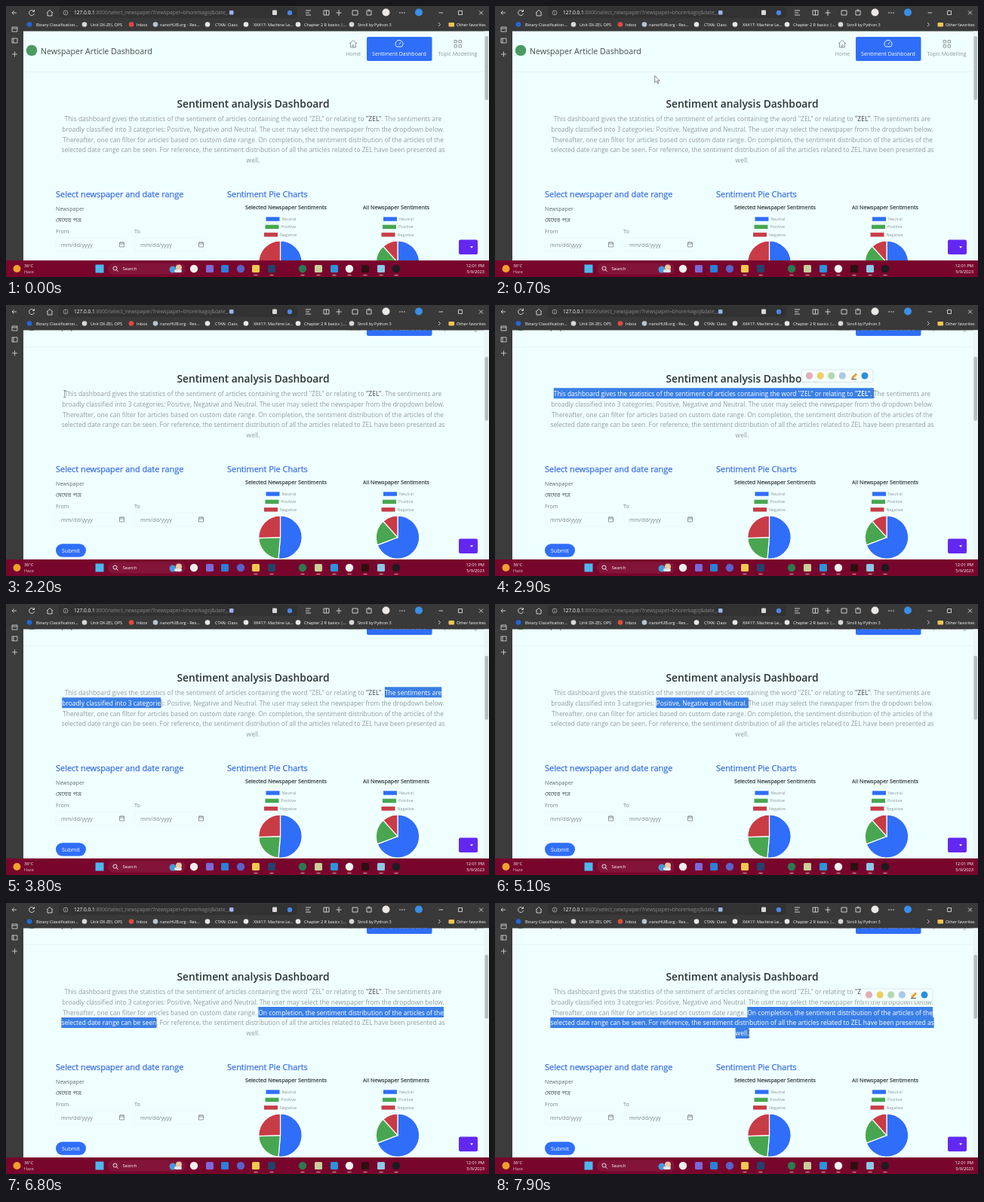
Animation of 640 by 360 pixels, one loop 8 s. Source, as an HTML page:

```html
<!DOCTYPE html>
<html lang="en">
<head>
<meta charset="utf-8">
<title>Dashboard walkthrough</title>
<style>
  html, body { margin: 0; width: 100%; height: 100%; overflow: hidden; background: #393939; }
  svg { display: block; width: 640px; height: 360px; font-family: "Open Sans", "Noto Sans", sans-serif; }
  text { white-space: pre; }
  .key { fill: var(--key); font-weight: 600; }
</style>
</head>
<body>
<svg id="stage" viewBox="0 0 640 360"></svg>
<script>
const BLUE = '#2f6ef8', GREEN = '#48a650', RED = '#c83c46', GREY = '#8c9494', PAGE = '#efffff';
const LOOP = 8000, SCROLL = 32, LINE_Y = 118, PITCH = 13.9;

const lines = [
  'This dashboard gives the statistics of the sentiment of articles containing the word "ZEL" or relating to "ZEL". The sentiments are',
  'broadly classified into 3 categories: Positive, Negative and Neutral. The user may select the newspaper from the dropdown below.',
  'Thereafter, one can filter for articles based on custom date range. On completion, the sentiment distribution of the articles of the',
  'selected date range can be seen. For reference, the sentiment distribution of all the articles related to ZEL have been presented as',
  'well.'
];

// Markup helpers
const text = (x, y, size, str, fill = '#fff', more = '') =>
  `<text x="${x}" y="${y}" font-size="${size}" fill="${fill}" ${more}>${str}</text>`;
const box = (x, y, w, h, fill, rx = 0, more = '') =>
  `<rect x="${x}" y="${y}" width="${w}" height="${h}" rx="${rx}" fill="${fill}" ${more}/>`;
const dot = (x, y, r, fill) => `<circle cx="${x}" cy="${y}" r="${r}" fill="${fill}"/>`;
const stroke = (d, color = '#ddd', w = 0.9) => `<path d="${d}" fill="none" stroke="${color}" stroke-width="${w}"/>`;
const mid = 'text-anchor="middle"', end = 'text-anchor="end"';
const medium = color => `stroke="${color}" stroke-width=".25"`;

function slice(cx, cy, r, from, to, fill) {
  const p = deg => {
    const a = deg * Math.PI / 180;
    return `${cx + r * Math.sin(a)} ${cy - r * Math.cos(a)}`;
  };
  return `<path d="M${cx} ${cy}L${p(from)}A${r} ${r} 0 ${+(to - from > 180)} 1 ${p(to)}Z" fill="${fill}" stroke="#fff" stroke-width="1.2"/>`;
}

function chart(x, title, titleX, greenAt, redAt) {
  const legend = [['Neutral', BLUE], ['Positive', GREEN], ['Negative', RED]].map(([name, fill], i) => {
    const lx = x - 20 - (i === 2 ? 1.5 : i ? 0 : -1), y = 283 + i * 10.4;
    return box(lx, y - 2.7, 18, 5.4, fill) + text(lx + 21, y + 2, 5.4, name, GREY);
  }).join('');
  return text(titleX, 270.2, 7.2, title, '#3c4444', `${mid} font-weight="500" ${medium('#3c4444')}`) + legend +
    slice(x, 340.6, 28.7, 0, greenAt, BLUE) +
    slice(x, 340.6, 28.7, greenAt, redAt, GREEN) +
    slice(x, 340.6, 28.7, redAt, 360, RED);
}

const calendar = x => stroke(`M${x - 3} 314h6v6h-6zM${x - 3} 316h6M${x - 1.5} 313v2M${x + 1.5} 313v2`, '#7c8484', 0.8);
const dateField = x => text(x, 319.7, 7.2, 'mm/dd/yyyy', '#7c8484') + calendar(x + 80.5) +
  box(x - 7, 308, 93, 18, 'none', 2, 'stroke="#e6f5f5" stroke-width=".6"');

const paragraph = lines.map((line, i) =>
  `<text x="327.5" y="${LINE_Y + SCROLL + 2.7 + i * PITCH}" font-size="8.43" ${mid}>` +
  line.replace(/"ZEL"(?=\.)/, '<tspan class="key">$&</tspan>') + '</text>').join('');

const page = `
  ${box(23, 87, 611, 0.6, '#e2f1f1')}
  ${dot(34, 59, 7.3, '#4b9a62')}
  ${text(46, 64, 10.63, 'Newspaper Article Dashboard', '#454d4d')}
  ${stroke('M455 50l5-4.5 5 4.5M456.5 49v6h7v-6M459 55v-3h2v3', '#8a9090')}
  ${text(460.5, 66.3, 6.8, 'Home', GREY, mid)}
  ${box(478, 41, 86.5, 32, BLUE, 2)}
  ${stroke('M517.5 54a5 5 0 1 1 7 0zM521 51l2-3', '#fff')}
  ${text(521, 66.3, 7.05, 'Sentiment Dashboard', '#fff', mid)}
  ${stroke('M594 45.5h3.5v3.5h-3.5zM600 45.5h3.5v3.5h-3.5zM594 51.5h3.5v3.5h-3.5zM600 51.5h3.5v3.5h-3.5z', '#8a9090')}
  ${text(598.5, 66.3, 7.15, 'Topic Modelling', GREY, mid)}
  ${text(327.5, 135, 13.8, 'Sentiment analysis Dashboard', '#2b3333', mid + ' font-weight="600"')}
  <g style="fill:#949c9c;--key:#687070"><g id="para">${paragraph}</g></g>
  <g clip-path="url(#selected)">
    ${box(23, 140, 611, 75, '#3a7fe6')}
    <use href="#para" style="fill:#fff;--key:#fff"/>
  </g>
  ${text(66, 253.5, 10.95, 'Select newspaper and date range', '#3a6ee8', medium('#3a6ee8'))}
  ${text(293, 253.5, 10.95, 'Sentiment Pie Charts', '#3a6ee8', medium('#3a6ee8'))}
  ${text(66, 271.7, 7.15, 'Newspaper', '#626a6a')}
  ${text(66, 287, 8, 'মেঘের পত্র', '#5a6262', 'font-family="Noto Sans Bengali, Noto Sans, sans-serif"')}
  ${text(66, 301.7, 7.2, 'From', '#7c8484')}
  ${text(170, 301.7, 7.2, 'To', '#7c8484')}
  ${dateField(73)}${dateField(178)}
  ${box(66, 349.3, 40, 17.5, BLUE, 8.7)}
  ${text(86, 360.7, 7.2, 'Submit', '#fff', mid)}
  ${chart(363.5, 'Selected Newspaper Sentiments', 371, 185, 268)}
  ${chart(519, 'All Newspaper Sentiments', 517, 249, 318)}`;

const bookmarks = [
  [31, 40, 'Binary Classification...', '#2467d8'],
  [104, 112, 'Unit DX-ZEL OPS', '#d8d8d8'],
  [166, 173, 'Inbox', '#e04a3f'],
  [198, 204, 'nanoHUB.org - Res...', '#b8c4d0'],
  [267, 277, 'CTAN: Class', '#e8e8e8'],
  [318, 328, 'XK417: Machine Le...', '#e8e8e8'],
  [387, 395, 'Chapter 2 R basics |...', '#e8e8e8'],
  [458, 466, 'Stroll by Python 3', '#d8d8d8']
].map(([ix, x, name, fill]) => dot(ix, 24.5, 3.3, fill) + text(x, 26.8, 5.5, name)).join('');

const url = '127.0.0.1:8000/select_newspaper/?newspaper=bhorerkagoj&amp;date_from=2023-...';

const chrome = `
  ${box(0, 0, 640, 33.5, '#393939')}
  ${box(0, 33, 23, 305, '#3c3c3c')}
  ${box(70, 1, 316, 15, '#323232', 4)}
  ${stroke('M14 9H8m2.5-2.5L8 9l2.5 2.5M37 7a3.5 3.5 0 1 0 .5 3M37.5 5v2.5H35M54 9l4-3.5L62 9M55 8.5V13h6V8.5')}
  ${stroke('M79 8v3M79 6v1M76 9a3 3 0 1 0 6 0a3 3 0 1 0-6 0', '#bbb', 0.7)}
  ${text(90, 11.3, 6.6, '127.0.0.1<tspan fill="#888">:8000/select_newspaper/?newspaper=bhorerkagoj&amp;date_...</tspan>')}
  ${box(296, 6, 5.5, 5.5, '#9db4ee', 1)}
  ${box(353, 5.5, 6, 6.5, '#d8d8d8', 1)}
  ${dot(376, 9, 3.2, '#4a86e0')}
  ${stroke('M397 6h7M397 9h5M397 12h7M421 6h7v6h-7zM424.5 6v6M441 5v8M437.5 9h7M459 6h7v6h-7zM478 6h6v6h-6zM481 4v4')}
  ${dot(503.5, 8.5, 5, '#ece8e6')}
  ${[522, 525, 528].map(x => dot(x, 9, 0.8, '#ddd')).join('')}
  ${dot(547, 8.5, 5, '#3a8fe8')}
  ${stroke('M573.5 9h5.5M599.5 6.5h5v5h-5zM627 6.5l5 5M632 6.5l-5 5')}
  ${bookmarks}
  ${stroke('M573 22l2.5 2.5L573 27')}
  ${box(586.5, 22, 7.5, 5.5, '#f0c552', 1)}
  ${text(597, 26.8, 5.5, 'Other favorites')}
  ${stroke('M8 28h7v6H8zM8 30h7M8 43h7v6H8zM10 43v6M8 64h7M11.5 60.5v7', '#ddd', 0.8)}
  ${box(633.5, 33.5, 6.5, 304.5, '#eaf5f5')}
  <rect id="thumb" x="634.5" width="4.5" height="85" rx="2" fill="#b4bebe"/>
  ${box(600, 310.5, 25, 19.5, '#6228f2', 2)}
  <path d="M615 319.3h4l-2 2.4z" fill="#fff"/>`;

const apps = [
  [249, '#eeeeee'], [270, '#7d68d8'], [290, '#2a80d8'], [311, '#5a62c8'], [331, '#f2c84e'],
  [352, '#24426c'], [393, '#2c7a50'], [414, '#c8cf9a'], [435, '#2b94dc'], [455, '#f2f2f2'],
  [476, '#2c1010'], [497, '#8cc8e8'], [517, '#1c1c20']
].map(([x, fill], i) => (i % 3 ? box(x - 5, 344, 10, 10, fill, 1.5) : dot(x, 349, 5.2, fill)) +
  (i > 3 ? box(x - 2.5, 357, 5, 1, '#d8a0b0') : '')).join('');

const taskbar = `
  ${box(0, 338, 640, 22, '#78052c')}
  ${dot(14.5, 349, 5, '#f0a02e')}
  ${text(24, 346.8, 5.5, '36°C')}${text(24, 354.5, 5.5, 'Haze', '#e0c0ca')}
  ${box(118.5, 343.5, 11, 11, '#4cb8ee')}
  ${box(135, 341.5, 103, 15, '#82143a', 7.5)}
  ${stroke('M142 348.5a2.5 2.5 0 1 0 5 0a2.5 2.5 0 1 0-5 0M146.5 350.5l2 2.2', '#fff')}
  ${text(154.5, 351.3, 6, 'Search')}
  ${dot(221, 350, 4.5, '#4a9ad8')}${dot(229, 347.5, 4, '#e8c8a0')}${box(223, 350, 10, 4, '#dfe8f0', 2)}
  ${apps}
  ${text(634, 346.8, 5.7, '12:01 PM', '#fff', end)}${text(634, 354.8, 5.7, '5/9/2023', '#fff', end)}`;

const popup = `<g id="popup">
  ${box(406, 86, 95, 16.5, '#f4fefe', 2, 'stroke="#d4dede" stroke-width=".7"')}
  ${['#dfb0bc', '#ecd068', '#b4d8b0', '#acc8e8'].map((c, i) => dot(416.5 + i * 14.6, 94, 4.7, c)).join('')}
  ${stroke('M473 97.5l6-6', '#e0a030', 3)}${stroke('M472 98.5h7', '#555', 1)}
  ${dot(490, 94, 4.5, '#2b8fd8')}</g>`;

document.getElementById('stage').innerHTML = `
  <defs><clipPath id="selected">${lines.map((_, i) =>
    `<rect y="${LINE_Y + SCROLL - 7.7 + i * PITCH}" height="${PITCH + 0.1}"/>`).join('')}</clipPath></defs>
  ${box(0, 0, 640, 360, PAGE)}
  <g id="page">${page}</g>
  ${popup}
  ${chrome}
  <g id="status">${box(23, 328, 205, 10, '#3a3a3a', 1)}${text(26, 335, 5.45, url, '#e4e4e4')}</g>
  ${taskbar}
  <g id="pointer" stroke-width=".7">
    <path id="arrow" d="M0 0v9l2.2-2 1.6 3.5 1.5-.7-1.6-3.3h3z" fill="#fff" stroke="#555"/>
    <path id="hand" d="M-.8-4.5q1-1 1.8 0v4l3.2 1q.8.3.7 1.3l-.8 4h-4.5l-2.6-3.5q0-1.5 2.2 0z" fill="#fff" stroke="#444"/>
    <path id="beam" d="M-1.5-4.5h3M0-4.5v9M-1.5 4.5h3" fill="none" stroke="#667"/>
  </g>`;

const $ = id => document.getElementById(id);
const set = (node, attrs) => { for (const k in attrs) node.setAttribute(k, attrs[k]); };
const show = (id, on) => set($(id), { visibility: on ? 'visible' : 'hidden' });
const bars = [...document.querySelectorAll('#selected rect')];

// Left edge of every character, plus the right edge of the last one
const edges = [...$('para').children].map((node, i) => {
  const n = lines[i].length;
  return [...Array(n + 1).keys()].map(c =>
    c < n ? node.getStartPositionOfChar(c).x : node.getEndPositionOfChar(n - 1).x);
});

// Screen point just after a phrase
const after = (l, phrase) => [edges[l][lines[l].indexOf(phrase) + phrase.length], LINE_Y + l * PITCH];

const path = [
  [0, 300, 130], [600, 240, 97], [1200, 70, 71], [1650, 70, 71],
  [2100, ...after(0, '')], [2250, ...after(0, '')], [2800, ...after(0, '". ')],
  [3250, ...after(0, '. ')], [3350, ...after(0, '. ')],
  [3800, ...after(1, 'categorie')], [3950, ...after(1, 'categories:')],
  [4400, ...after(1, 'categories: ')], [4500, ...after(1, 'categories: ')],
  [5050, ...after(1, 'Neutral. ')], [5450, ...after(1, 'Neutral. ')],
  [6050, ...after(2, 'range. ')], [6300, ...after(2, 'range. ')],
  [6800, ...after(3, 'seen')], [7000, ...after(3, 'seen.')],
  [7600, ...after(4, 'well.')], [LOOP, ...after(4, 'well.')]
];
const drags = [[2250, 2800], [3350, 3950], [4500, 5050], [5450, 6050], [6300, 7600]];

function pointerAt(t) {
  const i = Math.max(1, path.findIndex(p => p[0] >= t));
  const [t0, x0, y0] = path[i - 1], [t1, x1, y1] = path[i];
  const k = (t - t0) / (t1 - t0);
  return [x0 + (x1 - x0) * k, y0 + (y1 - y0) * k];
}

// Nearest caret place [line, character] to a point
function caretAt([x, y]) {
  const l = Math.round((y - LINE_Y) / PITCH), row = edges[l];
  return [l, row.reduce((best, e, c) => Math.abs(e - x) < Math.abs(row[best] - x) ? c : best, 0)];
}

function select(t) {
  const drag = drags.filter(d => d[0] <= t).pop();
  const [a, b] = drag
    ? [caretAt(pointerAt(drag[0])), caretAt(pointerAt(Math.min(t, drag[1])))].sort((p, q) => p[0] - q[0] || p[1] - q[1])
    : [[0, 0], [0, 0]];
  bars.forEach((bar, l) => {
    const inside = l >= a[0] && l <= b[0];
    const x0 = edges[l][l === a[0] ? a[1] : 0];
    const x1 = edges[l][l === b[0] ? b[1] : lines[l].length];
    set(bar, { x: x0, width: inside ? x1 - x0 : 0 });
  });
}

function draw(now) {
  const t = Math.floor(now % LOOP / 100) * 100;
  const k = Math.min(1, Math.max(0, (t - 1750) / 300));
  const scroll = SCROLL * k * k * (3 - 2 * k);
  set($('page'), { transform: `translate(0 ${-scroll})` });
  set($('thumb'), { y: 40 + scroll * 0.9 });
  select(t);

  const [x, y] = pointerAt(t), hand = t >= 1150 && t < 1750, beam = t >= 2000;
  set($('pointer'), { transform: `translate(${x} ${y})` });
  show('arrow', t >= 200 && !hand && !beam);
  show('hand', hand);
  show('beam', beam);
  show('status', hand);

  const late = t >= 7700;
  show('popup', late || (t >= 2850 && t < 3300));
  set($('popup'), { transform: late ? 'translate(79 28)' : '' });
  requestAnimationFrame(draw);
}
requestAnimationFrame(draw);
</script>
</body>
</html>
```
